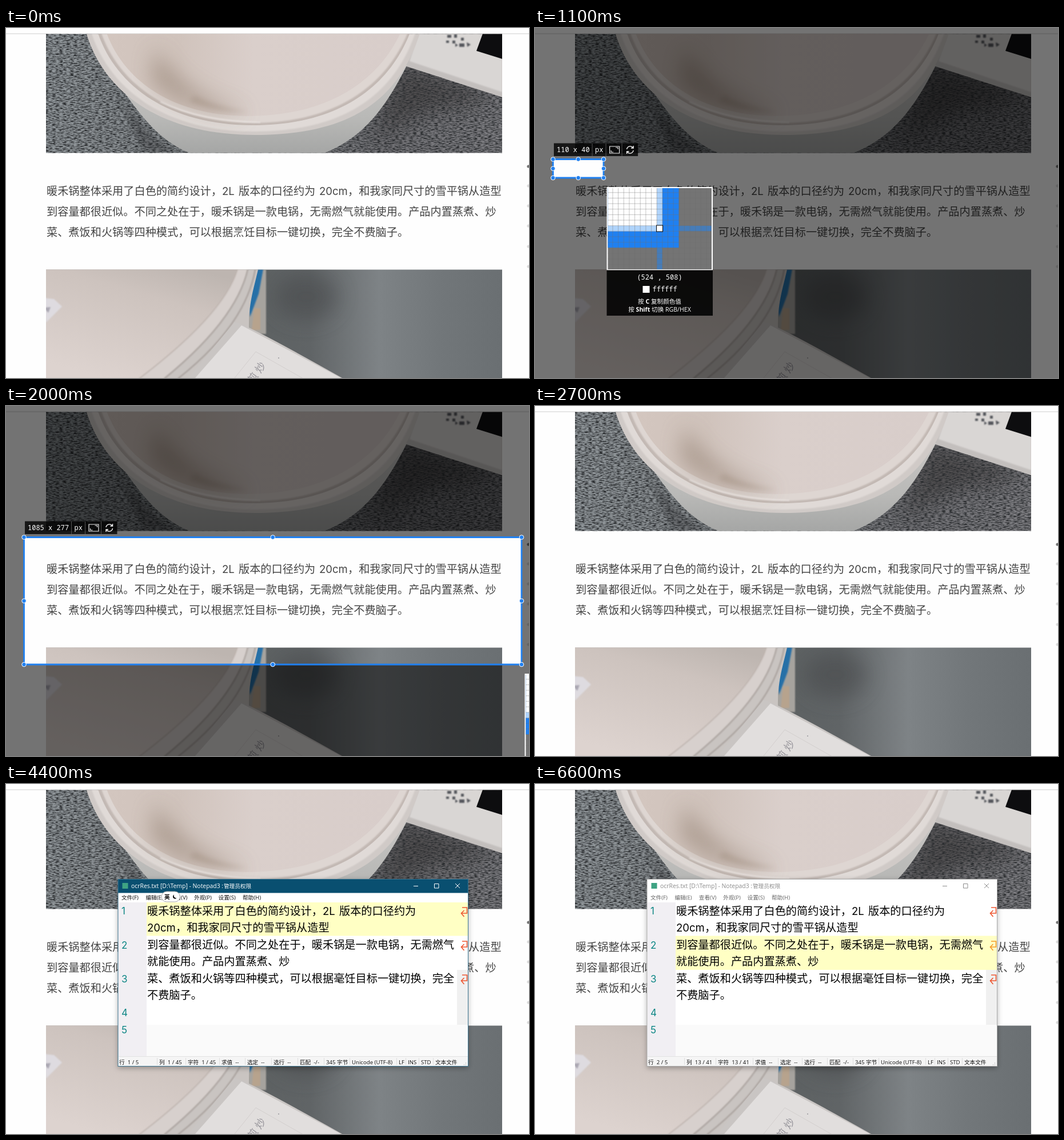
Write an HTML page that moves like this. It is 915 px wide and 612 px high and loops after 6700 ms.

```html
<!DOCTYPE html>
<html lang="zh-CN">
<head>
<meta charset="utf-8">
<title>Screen capture to text</title>
<style>
html, body { margin: 0; width: 100%; height: 100%; overflow: hidden; background: #fefefe; }
#stage { display: block; width: 915px; height: 612px; }
text { white-space: pre; font-family: "Open Sans", "Noto Sans CJK SC", "Noto Sans CJK", sans-serif; }
.body { font: 19.2px "Noto Sans CJK SC", "Noto Sans CJK", sans-serif; }
.latin { font: 18.5px Inter, sans-serif; }
.ui { font-size: 9.65px; }
.title { font-size: 10.4px; }
.mono { font: 12px "Noto Sans Mono", monospace; fill: #fff; }
.hint { font-size: 10.6px; fill: #fff; text-anchor: middle; }
.num { font: 17px Inter, sans-serif; fill: #0a8583; }
</style>
</head>
<body>
<svg id="stage" viewBox="0 0 915 612">
  <defs>
    <filter id="b1" x="-20%" y="-20%" width="140%" height="140%"><feGaussianBlur stdDeviation="1.2"/></filter>
    <filter id="b4" x="-40%" y="-40%" width="180%" height="180%"><feGaussianBlur stdDeviation="4"/></filter>
    <filter id="b18" x="-60%" y="-60%" width="220%" height="220%"><feGaussianBlur stdDeviation="18"/></filter>
    <filter id="weave" x="0" y="0" width="100%" height="100%" color-interpolation-filters="sRGB">
      <feTurbulence type="fractalNoise" baseFrequency=".16 .6" numOctaves="2" seed="4"/>
      <feColorMatrix values="0 0 0 0 .16  0 0 0 0 .17  0 0 0 0 .18  2.8 0 0 0 -1.1"/>
    </filter>
    <filter id="shadow" x="-10%" y="-10%" width="120%" height="125%">
      <feDropShadow dx="0" dy="3" stdDeviation="5" flood-opacity=".32"/>
    </filter>
    <linearGradient id="cloth"><stop stop-color="#90969a"/><stop offset=".3" stop-color="#84888b"/><stop offset=".75" stop-color="#727276"/><stop offset="1" stop-color="#7c7c80"/></linearGradient>
    <linearGradient id="inside"><stop stop-color="#d3c6bf"/><stop offset=".25" stop-color="#d0c3bc"/><stop offset=".5" stop-color="#dacfcb"/><stop offset="1" stop-color="#d8cdca"/></linearGradient>
    <linearGradient id="side" x2="0" y2="1"><stop stop-color="#c8c6c4"/><stop offset=".6" stop-color="#b9b9b7"/><stop offset="1" stop-color="#a5a6a5"/></linearGradient>
    <linearGradient id="lid" x1=".8" y1="0" x2=".3" y2="1"><stop stop-color="#bdb5b0"/><stop offset=".3" stop-color="#cdc3be"/><stop offset="1" stop-color="#ddd3cf"/></linearGradient>
    <linearGradient id="back"><stop offset=".46" stop-color="#5d6162"/><stop offset=".58" stop-color="#606466"/><stop offset=".73" stop-color="#7e8386"/><stop offset=".86" stop-color="#72777a"/><stop offset="1" stop-color="#6a6f72"/></linearGradient>
  </defs>

  <rect width="915" height="612" fill="#fefefe"/>
  <path d="M0 10h915" stroke="#dedede" stroke-width="1.5"/>

  <svg x="70" y="10.5" width="798" height="208" viewBox="70 10.5 798 208">
    <rect x="70" y="10" width="798" height="209" fill="url(#cloth)"/>
    <path d="M690 60L868 118L790 140Q730 140 640 200Z" fill="#3b3839" opacity=".65" filter="url(#b18)"/>
    <path d="M190 100Q240 190 300 218H240Z" fill="#3c3e40" opacity=".4" filter="url(#b4)"/>
    <rect x="70" y="10" width="798" height="209" filter="url(#weave)"/>
    <path d="M715 10H868V121L697 66Z" fill="#c3bfbd"/>
    <path d="M722 10H868V112L706 58Z" fill="#d9d6d4" filter="url(#b1)"/>
    <path d="M834 10H868V54L823 40Z" fill="#0d0d0f"/>
    <g fill="#55565c" filter="url(#b1)">
      <path d="M772 12h7v5h-7zM784 11h5v6h-5zM770 22h5v4h-5zM781 22h5v5h-5zM796 17h5v5h-5zM806 25l7 4l-6 4zM793 27h9v6h-9zM786 27l5 3l-5 3z"/>
    </g>
    <path d="M170 60C215 120 250 190 322 219H556C625 192 664 140 702 64Z" fill="url(#side)"/>
    <path d="M138 0C162 95 250 187 436 187S694 110 727 0Z" fill="#d0cac7"/>
    <path d="M147 0C172 92 262 181 434 181S686 104 719 0Z" fill="#e0dad7" filter="url(#b1)"/>
    <path d="M158 0C185 92 274 170 432 170S676 96 710 0Z" fill="#c3b9b4"/>
    <path d="M164 0C190 88 278 166 432 166S672 92 706 0Z" fill="#ded6d2" filter="url(#b1)"/>
    <path d="M173 0C200 86 285 154 424 154S656 92 694 0Z" fill="url(#inside)"/>
    <path d="M262 30C280 80 330 125 425 148Q330 156 255 92Z" fill="#8e7b6c" opacity=".6" filter="url(#b18)"/>
    <path d="M330 118Q370 138 425 147Q365 149 320 128Z" fill="#94816f" opacity=".3" filter="url(#b4)"/>
    <path d="M270 129Q340 163 445 165" fill="none" stroke="#f3efed" stroke-width="2" opacity=".6" filter="url(#b1)"/>
  </svg>

  <svg x="70" y="422.5" width="798" height="190" viewBox="70 422.5 798 190">
    <rect x="70" y="422" width="798" height="191" fill="url(#back)"/>
    <ellipse cx="525" cy="470" rx="55" ry="40" fill="#484b4d" opacity=".6" filter="url(#b18)"/>
    <path d="M436 422H455V535H420Z" fill="#a6a39e" filter="url(#b1)"/>
    <path d="M440 422H450L442 465L427 505L424 480Z" fill="#2870a7" filter="url(#b1)"/>
    <path d="M434 490H445V528H430Z" fill="#b7a38d" filter="url(#b1)"/>
    <path d="M70 422H441C434 455 424 480 425 530L345 613H70Z" fill="#c9c4c1"/>
    <path d="M70 422H424Q404 510 278 613H70Z" fill="#d7d0cd"/>
    <path d="M423 422Q403 510 277 613M436 422Q419 520 301 613" fill="none" stroke="#aaa39f" stroke-width="2.5" filter="url(#b1)"/>
    <path d="M70 422H405Q382 500 233 613H70Z" fill="url(#lid)"/>
    <path d="M405 422Q382 500 233 613" fill="none" stroke="#bfb5b0" stroke-width="2" filter="url(#b1)"/>
    <path d="M66 472L84 474L98 487L70 515Z" fill="#dedbe0" filter="url(#b1)"/>
    <path d="M66 489L78 488L74 498Z" fill="#aaa7b2" filter="url(#b1)"/>
    <path d="M400 514Q416 515 590 613H318Z" fill="#c9c5c3"/>
    <path d="M412 520L588 613H330Z" fill="#e1dedd"/>
    <path d="M437 566L399 613M437 566L520 613" fill="none" stroke="#d2cecd"/>
    <g fill="#96949a"><text transform="translate(432 623) rotate(-55)" font-size="18">煎 炒</text><circle cx="477" cy="577" r="1"/></g>
  </svg>

  <g id="page"></g>
  <g id="live"></g>
</svg>
<script>
const LOOP = 6700, BLUE = '#2080f0', PALE = '#b0d4fb';
const ORIGIN = { x: 31.5, y: 229.5 }, SCALE = .8025;

// time, corner x, corner y
const DRAG = [
  [800, 52, 238], [900, 31.5, 229.5], [1100, 120, 262], [1200, 335, 335],
  [1300, 577.5, 411], [1400, 690, 425], [1500, 775, 437], [1600, 844, 446],
  [1700, 878, 449], [1800, 890, 451], [1900, 898, 452], [2000, 902, 452]
];
const FADE = [.7, .4, .15];

const text = (x, y, s, cls = 'ui', extra = '') => `<text x="${x}" y="${y}" class="${cls}" ${extra}>${s}</text>`;
const rect = (x, y, w, h, fill, extra = '') => `<rect x="${x}" y="${y}" width="${w}" height="${h}" fill="${fill}" ${extra}/>`;
const line = (d, stroke, width = 1) => `<path d="${d}" fill="none" stroke="${stroke}" stroke-width="${width}"/>`;
const dot = (x, y, r, fill, extra = '') => `<circle cx="${x}" cy="${y}" r="${r}" fill="${fill}" ${extra}/>`;
const runs = list => list.map(([x, y, s]) => text(x, y, s, /^\d/.test(s) ? 'latin' : 'body')).join('');

function pageText() {
  const dots = [242, 276, 311, 346, 382, 417].map((y, i) => dot(914, y, 2.6, i ? '#dcdcdc' : '#777')).join('');
  return dots + '<g fill="#444">' + runs([
    [71, 292, '暖禾锅整体采用了白色的简约设计，'], [378, 292, '2L'], [407, 292, '版本的口径约为'],
    [548, 292, '20cm'], [598, 292, '，和我家同尺寸的雪平锅从造型'],
    [71, 328, '到容量都很近似。不同之处在于，暖禾锅是一款电锅，无需燃气就能使用。产品内置蒸煮、炒'],
    [71, 364, '菜、煮饭和火锅等四种模式，可以根据烹饪目标一键切换，完全不费脑子。']
  ]) + '</g>';
}

function magnifier(cx, cy, w, h, selecting) {
  const x = cx + (selecting ? 5.5 : 7.5), y = cy + (selecting ? 16 : 17.5);
  const cell = 9.65, mx = 92.5, my = 72.5, half = cell / 2;
  let grid = '';
  for (let i = -10; i <= 10; i++) {
    const gx = mx + (i + .5) * cell, gy = my + (i + .5) * cell;
    if (gx > 2 && gx < 183) grid += `M${gx} 2V144`;
    if (gy > 2 && gy < 144) grid += `M2 ${gy}H183`;
  }
  const cross = fill => rect(mx - half, 2, cell, 142, fill) + rect(2, my - half, 181, cell, fill);
  let view = rect(0, 0, 185.5, 145.5, '#fff');
  if (selecting) {
    const edge = 3 * cell;
    view += rect(2, 2, 181.5, 142, '#747474') + cross('#467cb8')
      + rect(2, 2, mx + half + edge - 2, my + half + edge - 2, BLUE)
      + rect(2, 2, mx + half - 2, my + half - 2, '#fff')
      + rect(mx - half, 2, cell, my + half - 2, PALE) + rect(2, my - half, mx + half - 2, cell, PALE);
  } else view += cross(PALE);
  view += line(grid, selecting ? 'rgba(110,110,110,.4)' : '#ccc')
    + rect(mx - 5.5, my - 5.5, 11, 11, '#fff', 'stroke="#000"');
  return `<g transform="translate(${x} ${y})">${view}
    ${rect(0, 145.5, 185.5, 79.5, selecting ? 'rgba(0,0,0,.88)' : 'rgba(0,0,0,.75)')}
    ${selecting ? '' : rect(.5, .5, 185, 224.5, 'none', 'stroke="#333"')}
    ${text(mx, 162, `(${414 + Math.max(1, w)} , ${468 + Math.max(1, h)})`, 'mono', 'text-anchor="middle"')}
    ${rect(63, 173, 12, 12, '#fff')}${text(80, 183, 'ffffff', 'mono')}
    ${text(mx, 203.5, '按 <tspan font-weight="700">C</tspan> 复制颜色值', 'hint')}
    ${text(mx, 217.5, '按 <tspan font-weight="700">Shift</tspan> 切换 RGB/HEX', 'hint')}</g>`;
}

function sizeLabel(w, h) {
  const s = `${w} x ${h}`, a = 42 + s.length * 7.2 + .5;
  const seps = [a, a + 24, a + 52].map(x => `M${x} 202V224`).join('');
  return rect(33, 201.5, a + 80 - 33, 22.5, 'rgba(0,0,0,.8)') + line(seps, '#555')
    + text(38, 217, s, 'mono') + text(a + 5, 217, 'px', 'mono')
    + `<g transform="translate(${a} 213)">`
    + line('M30.5-6H47.5V6H30.5ZM33 1V4H37M41-4H45V-1', '#eee', 1.2)
    + line('M60.5-1A6 6 0 0 1 71-4M72-7V-3H68M72 1A6 6 0 0 1 61.5 4M60.5 7V3H64.5', '#fff', 1.4) + '</g>';
}

function capture(t) {
  const [, cx, cy] = DRAG.findLast(k => k[0] <= t);
  const w = Math.round((cx - ORIGIN.x) / SCALE), h = Math.round((cy - ORIGIN.y) / SCALE);
  if (t < 1100) {
    const marks = [[457, -2], [-2, 305], [916, 305], [457, 613]].map(([x, y]) => dot(x, y, 3.2, BLUE)).join('');
    return marks + magnifier(cx, cy, w, h, false);
  }
  const { x, y } = ORIGIN, hx = (x + cx) / 2, hy = (y + cy) / 2;
  const box = `M${x} ${y}H${cx}V${cy}H${x}Z`;
  const grips = [[x, y], [hx, y], [cx, y], [cx, hy], [cx, cy], [hx, cy], [x, cy], [x, hy]]
    .map(([px, py]) => dot(px, py, 3.8, BLUE, 'stroke="#fff"')).join('');
  const opacity = t < 2400 ? 1 : FADE[(t - 2400) / 100];
  return `<g opacity="${opacity}"><path d="M0 0H915V612H0Z${box}" fill-rule="evenodd" fill="#000" fill-opacity=".545"/>`
    + line(box, BLUE, 2.8) + grips + sizeLabel(w, h) + magnifier(cx, cy, w, h, true) + '</g>';
}

function frameBar(title, active) {
  const ink = active ? '#fff' : '#8c8c8c', menuInk = active ? '#111' : '#666';
  const menu = ['文件(F)', '编辑(E)', '查看(V)', '外观(P)', '设置(S)', '帮助(H)'];
  return rect(196, 166, 612.5, 24.5, active ? '#094f70' : '#fff')
    + rect(203.5, 173, 10, 10, '#3fa383')
    + title.map(([x, s], i) => text(x, 181.5, s, i ? 'ui' : 'title', `fill="${ink}"`)).join('')
    + line('M713 178.5h8M749.5 174.5h7.5v7.5h-7.5zM786 174l8 8M794 174l-8 8', ink)
    + menu.map((s, i) => text(202 + i * 42.4, 201.5, s, 'ui', `fill="${menuInk}"`)).join('');
}

function status(second) {
  const [row, col] = second ? ['2 / 5', '13 / 41'] : ['1 / 5', '1 / 45'];
  const xs = second ? [265, 320, 385, 429, 471, 515] : [268, 318, 377, 422, 468, 514];
  const items = [[198, '行  ' + row], [xs[0], '列  ' + col], [xs[1], '字符  ' + col],
    [xs[2], '求值  --'], [xs[3], '选定  --'], [xs[4], '选行  --'], [xs[5], '匹配  -/-'], [560, '345 字节'],
    [605, 'Unicode (UTF-8)'], [687, 'LF'], [703, 'INS'], [726, 'STD'], [751, '文本文件']];
  return rect(197, 476, 611, 17, '#f5f5f5') + line('M197 476.5H808', '#e2e2e2')
    + line(items.slice(1).map(([x]) => `M${x - 3.5} 479v12`).join(''), '#dedede')
    + items.map(([x, s]) => text(x, 489.5, s, 'ui', 'fill="#111"')).join('')
    + line('M801 491h1M804 491h1M804 488h1', '#999');
}

function editor(second) {
  const nums = [228, 287.5, 346.5, 406, 435.5].map((y, i) => text(202, y, i + 1, 'num')).join('');
  const wraps = [216, 275, 334].map((y, i) =>
    line(`M798 ${y}h8.5v10h-9.5M801.5 ${y + 5}l-5 5l5 6`, i === 1 && second ? '#f59a28' : '#ee5630', 1.6)).join('');
  return rect(197, 207, 49, 269, '#f1eff3') + rect(246, 421, 562, 55, '#fafafa')
    + rect(789, 325, 19, 96, '#f0f0f0')
    + rect(246, second ? 265.5 : 207, 562, second ? 59.5 : 58.5, '#ffffc4')
    + nums + wraps + '<g fill="#000">' + runs([
      [247, 228.5, '暖禾锅整体采用了白色的简约设计，'], [554, 228.5, '2L'], [583, 228.5, '版本的口径约为'],
      [247, 258, '20cm'], [297, 258, '，和我家同尺寸的雪平锅从造型'],
      [247, 288, '到容量都很近似。不同之处在于，暖禾锅是一款电锅，无需燃气'],
      [247, 317, '就能使用。产品内置蒸煮、炒'],
      [247, 347, '菜、煮饭和火锅等四种模式，可以根据毫饪目标一键切换，完全'],
      [247, 376, '不费脑子。']
    ]) + '</g>';
}

function badge(x, y) {
  return `<g transform="translate(${x} ${y})">` + rect(.5, .5, 32.5, 18, '#fff', 'rx="9" stroke="#aaa"')
    + text(5.5, 13, '英', 'ui', 'font-weight="700"')
    + '<path d="M22.5 6a3.8 3.8 0 1 0 4.5 6a4.3 4.3 0 0 1-4.5-6z"/></g>';
}

function notepad(t) {
  const blank = t < 4100, second = t >= 5100, active = t < 6600;
  const [scale, opacity] = blank ? [.98, .6] : t < 4200 ? [.995, .92] : [1, 1];
  const title = blank ? [[219, 'Notepad3']] : [[219, 'ocrRes.txt [D:\\Temp] - Notepad3 : '], [381, '管理员权限']];
  const caretOn = second ? t < 5600 || (t >= 6100 && active) : !blank && (t < 4400 || t >= 4900);
  const bare = rect(795, 207, 12.5, 286, '#efefef') + rect(795.5, 222, 11, 12, '#d2d2d2')
    + line('M798 215l3-3l3 3M798 467l3 3l3-3', '#444');
  const caret = caretOn ? rect(second ? 476 : 246, second ? 265 : 206, 1.2, 30, '#000') : '';
  const win = `<g opacity="${opacity}" transform="translate(502 329.5) scale(${scale}) translate(-502 -329.5)">`
    + rect(196, 166, 612.5, 327.5, '#fff', 'filter="url(#shadow)"')
    + frameBar(title, active) + (blank ? bare : editor(second) + status(t >= 5200)) + caret
    + rect(196, 166.5, 612.5, 327, 'none', `stroke="${active ? '#3d7590' : '#aaa'}"`) + '</g>';
  const tip = t < 4900 ? badge(271.5, 187.5) : t >= 5200 && t < 6100 ? badge(502, 246.5) : '';
  return win + tip;
}

function scene(t) {
  if (t >= 800 && t < 2700) return capture(t);
  return t >= 4000 ? notepad(t) : '';
}

document.getElementById('page').innerHTML = pageText();
const live = document.getElementById('live'), start = performance.now();
let shown = -1;
function draw() {
  const t = Math.floor((performance.now() - start) % LOOP / 100) * 100;
  if (t !== shown) live.innerHTML = scene(shown = t);
  requestAnimationFrame(draw);
}
draw();
</script>
</body>
</html>
```
